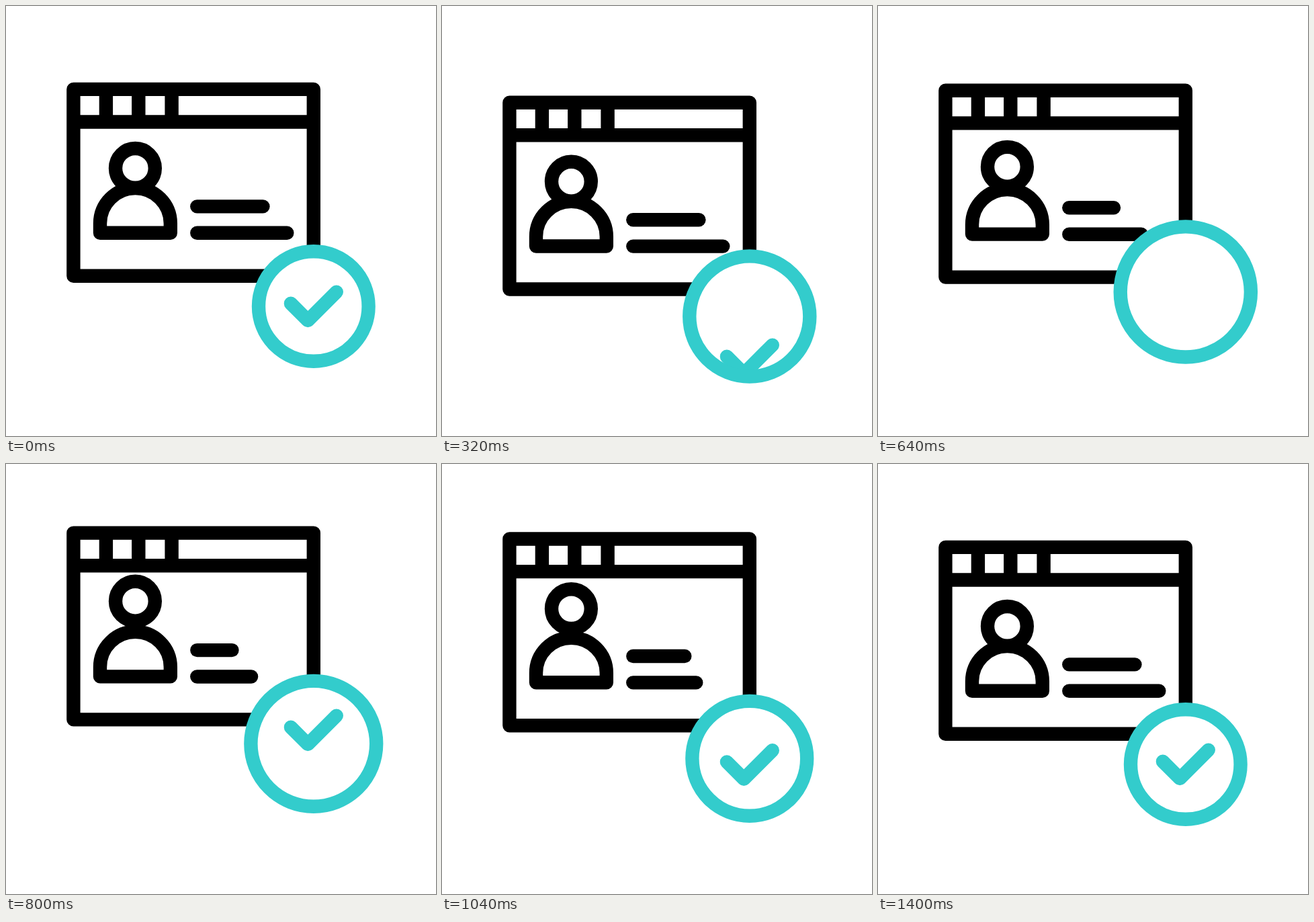
Animation, 640 px wide and 640 px high, one loop 1560 ms. Source, as an HTML page:

```html
<!DOCTYPE html>
<html lang="en">
<head>
<meta charset="utf-8">
<title>Verified profile</title>
<style>
  html, body { margin: 0; width: 100%; height: 100%; overflow: hidden; background: #fff; }
  svg { display: block; width: 100%; height: 100%; }
  .ink { fill: none; stroke: #000; }
  .teal { fill: none; stroke: #33cccc; }
  .ink, .teal { stroke-width: 20.4; stroke-linejoin: round; }
  .round { stroke-linecap: round; }
</style>
</head>
<body>
<svg viewBox="0 0 640 640">
  <defs>
    <clipPath id="inside"><circle id="hole" cx="457.8" cy="447" r="81.8"/></clipPath>
  </defs>
  <g id="win" class="ink">
    <rect x="100.4" y="123.9" width="357.4" height="277.8"/>
    <path d="M100.4 172.5H457.8M148.9 124V172M197.3 124V172M246.6 124V172"/>
    <circle id="head" cx="192.4" cy="241.4" r="29.4"/>
    <path d="M140 337.7V323.5A52.4 52.4 0 0 1 244.8 323.5V337.7Z"/>
    <path id="line1" class="round"/>
    <path id="line2" class="round"/>
  </g>
  <circle id="disc" cx="457.8" cy="447" r="81.8" fill="#fff"/>
  <g clip-path="url(#inside)">
    <path id="check" class="teal round" d="M423.9 442.7L449.3 468.1L491.8 425.6"/>
  </g>
  <circle id="ring" class="teal" cx="457.8" cy="447" r="81.8"/>
</svg>
<script>
  const LOOP = 1560, STEP = 40;
  const el = id => document.getElementById(id);
  const [win, head, line1, line2, hole, disc, check, ring] =
    ["win", "head", "line1", "line2", "hole", "disc", "check", "ring"].map(el);

  // Smooth 0 to 1 between two times.
  function ramp(t, from, to) {
    const u = Math.min(1, Math.max(0, (t - from) / (to - from)));
    return u * u * (3 - 2 * u);
  }

  // Smooth 0 to 1 and back to 0.
  const swing = (t, from, peak, to) => ramp(t, from, peak) - ramp(t, peak, to);

  const shift = (node, y) => node.setAttribute("transform", `translate(0 ${y})`);

  function drawWindow(t) {
    const low = 26.5, high = 22.7;
    shift(win, low * ramp(t, 74, 440) - (low + high) * ramp(t, 440, 840)
      + high * ramp(t, 876, 1226));
    shift(head, -18 * swing(t, 538, 871, 1380));
    line1.setAttribute("d", `M284.3 298.4H${382.4 - 46 * swing(t, 383, 794, 1260)}`);
    line2.setAttribute("d", `M284.3 337.8H${418.3 - 56 * swing(t, 439, 856, 1378)}`);
  }

  function drawBadge(t) {
    const y = 17 * swing(t, 58, 393, 745) - 32 * swing(t, 393, 745, 1194);
    const r = 81.8 + 15.7 * swing(t, 70, 575, 1250);
    for (const c of [hole, disc, ring]) {
      c.setAttribute("cy", 447 + y);
      c.setAttribute("r", r);
    }
    // The tick drops out below, then falls in from above and settles.
    const drop = 130, turn = 585;
    const fall = t < turn
      ? drop * ramp(t, 60, turn)
      : drop * (ramp(t, turn, 900) - 1) + 14 * swing(t, turn, 900, 1265);
    shift(check, y + fall);
  }

  function tick() {
    const t = Math.floor(performance.now() % LOOP / STEP) * STEP;
    drawWindow(t);
    drawBadge(t);
    requestAnimationFrame(tick);
  }
  tick();
</script>
</body>
</html>
```
